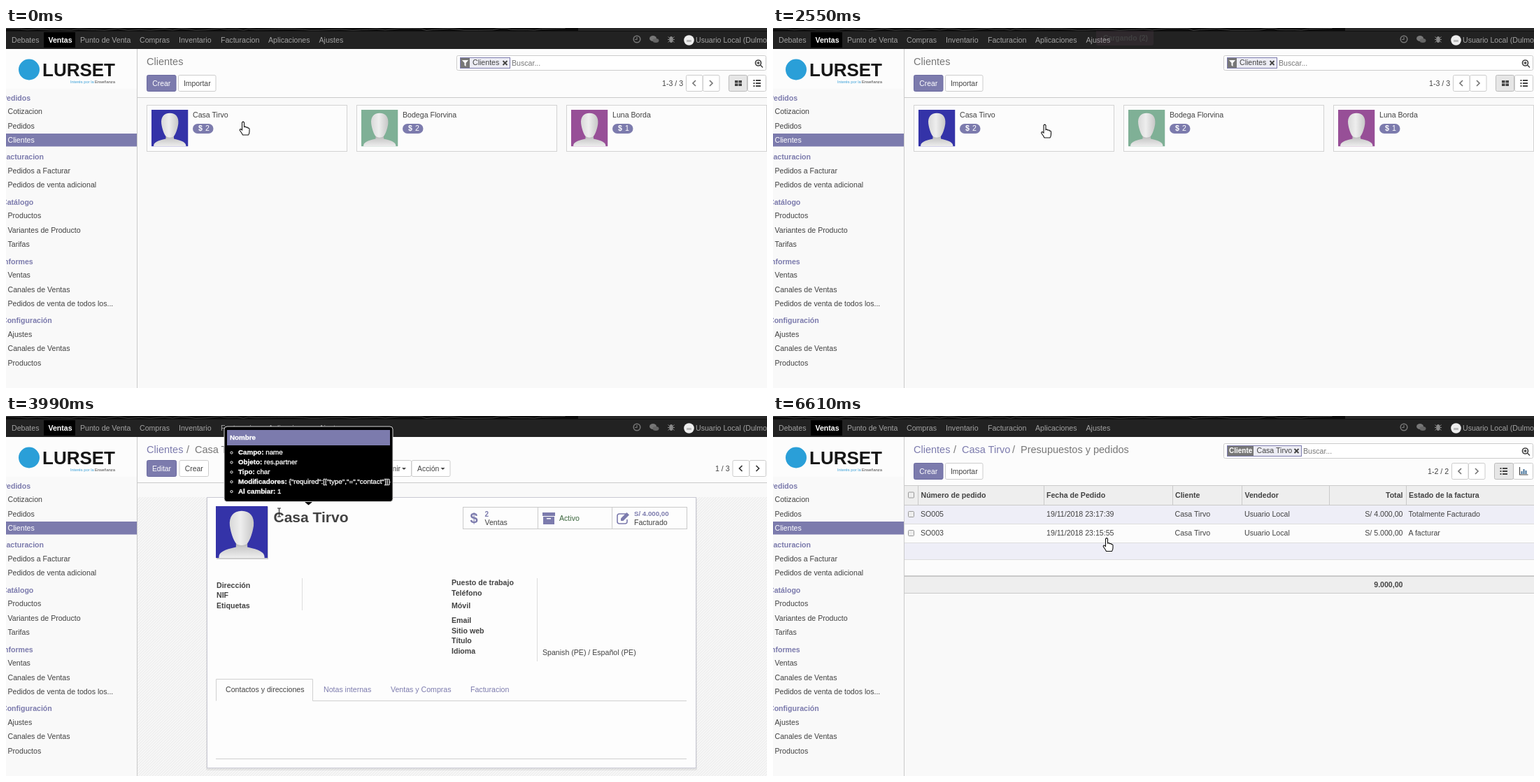
These frames come from a looping animation (1088x515 px, 8 s). An HTML page:

```html
<!DOCTYPE html>
<html lang="es">
<head>
<meta charset="utf-8">
<title>Clientes</title>
<style>
html, body { margin: 0; width: 100%; height: 100%; overflow: hidden; background: #f9f9f9 }
svg { display: block; font-family: "Liberation Sans", Arial, sans-serif }
#tip text { stroke: #fff; stroke-width: .3px }
</style>
</head>
<body>
<script>
const INK = '#424242', LILAC = '#7c7bad', GREY = '#777', LINE = '#cacaca';
const BUYER = 'Casa Tirvo', SELLER = 'Usuario Local';

// y is the middle of the capitals
const text = (x, y, s, fill = INK, bold = 0, size = 10.6, anchor = 'start') =>
  `<text x="${x}" y="${y + size * .36}" fill="${fill}" font-size="${size}" text-anchor="${anchor}"${bold ? ' font-weight="700"' : ''}>${s}</text>`;
const rect = (x, y, w, h, fill, stroke = 'none', r = 0) =>
  `<rect x="${x}" y="${y}" width="${w}" height="${h}" rx="${r}" fill="${fill}" stroke="${stroke}"/>`;
const path = (d, stroke = LINE, width = 1, fill = 'none') =>
  `<path d="${d}" stroke="${stroke}" stroke-width="${width}" fill="${fill}"/>`;
const group = (id, ...parts) => `<g id="${id}">${parts.join('')}</g>`;

const button = (x, y, w, label, main) =>
  rect(x + .5, y + .5, w - 1, 23, main ? LILAC : '#fff', main ? '#6b6aa0' : '#ccc', 2) +
  text(x + w / 2, y + 12, label, main ? '#fff' : INK, 0, 10.4, 'middle');
const menuButton = (x, y, w, label) =>
  button(x, y, w, '') + text(x + 8.5, y + 12, label, INK, 0, 10.4) +
  path(`M${x + w - 14} ${y + 11}h6l-3 3z`, 'none', 0, INK);
const pager = (x, y, label, labelX, color) =>
  text(labelX, y + 12, label) + button(x, y, 24.5, '') + button(x + 24, y, 24.5, '') +
  path(`M${x + 14} ${y + 8}l-4 4 4 4M${x + 34} ${y + 8}l4 4-4 4`, color, 1.7);
const avatar = (x, y, size, color) =>
  `<svg x="${x}" y="${y}" width="${size}" height="${size}" viewBox="0 0 100 100">` +
  rect(0, 0, 100, 100, color) +
  '<path d="M6 98C6 89 16 84 39 79V66H61V79C84 84 94 89 94 98V100H6Z" fill="url(#body)"/>' +
  '<path d="M50 9C66 9 75 20 73 38C71 52 66 66 61 72C57 77 43 77 39 72C34 66 29 52 27 38C25 20 34 9 50 9Z" fill="url(#head)"/></svg>';
const title = (x, y, s, color = LILAC) => text(x, y, s, color, 0, 14.5);
const listIcon = x => [75, 79, 83].map(y => rect(x, y - 1, 2, 2, INK) + rect(x + 3.5, y - 1, 7, 2, INK)).join('');

function search(facetEnd, hintX) {
  return rect(644.5, 39.5, 442, 21, '#fff', '#ccc', 2) +
    rect(649.5, 42.5, facetEnd - 650, 15, '#ececf4', LILAC) +
    path(`M${facetEnd - 10.5} 47l6 6m0-6l-6 6`, INK, 1.8) +
    text(hintX, 50, 'Buscar...', GREY) +
    '<circle cx="1075.500" cy="50" r="4" fill="none" stroke="#444" stroke-width="1.700"/>' +
    path('M1078.500 53l3.500 3.500M1073.500 50h4m-2-2v4', '#444', 1.5);
}

function panel(bottom) {
  return rect(188, 30, 900, bottom - 30, '#fcfcfc') + path(`M188 ${bottom - .5}H1088`);
}

function card(x, name, count, color) {
  return rect(x + .5, 110.5, 286, 66, '#fcfcfc', '#d3d3d3') + avatar(x + 7, 117, 52.5, color) +
    text(x + 66, 124, name) + rect(x + 66, 137, 29.5, 14, LILAC, 'none', 7) +
    text(x + 74, 143.5, '$', '#fff', 1) + text(x + 84, 143.5, count, '#fff');
}

const kanban = group('kanban', panel(100),
  title(201, 48, 'Clientes', GREY), button(201, 67, 42.5, 'Crear', 1), button(246, 67, 54.5, 'Importar'),
  search(721, 723), rect(650, 43, 13, 14, GREY), path('M652 46h9l-3.500 4v5l-2-1.500V50z', 'none', 0, '#fff'),
  text(667, 49.5, 'Clientes'), pager(972, 67, '1-3 / 3', 938, GREY),
  button(1060, 67, 27, ''), rect(1033.5, 67.5, 26, 23, '#e6e6e6', '#bbb', 2),
  [1042, 1047.5].map(x => rect(x, 75, 4.5, 3.5, INK) + rect(x, 79.5, 4.5, 3.5, INK)).join(''), listIcon(1068.5),
  card(201, BUYER, 2, '#3433a8'), card(501, 'Bodega Florvina', 2, '#7fb096'), card(801, 'Luna Borda', 1, '#974f97'));

const labels = (x, rows) => rows.map(([y, s]) => text(x, y, s, INK, 1)).join('');
const form = group('form', panel(96), rect(188, 116, 900, 399, 'url(#weave)'),
  title(201, 48, 'Clientes'), title(258, 48, '/', GREY), title(270, 48, BUYER, GREY),
  button(201, 63, 43, 'Editar', 1), button(247.5, 63, 42.5, 'Crear'),
  menuButton(518, 63, 62, 'Imprimir'), menuButton(579.5, 63, 56, 'Acción'),
  pager(1038.5, 63, '1 / 3', 1014, '#333'),
  rect(286, 117, 702, 390, '#0001', 'none', 2), rect(287.5, 116.5, 699, 387, '#fdfdfd', '#c8c8d3'),
  rect(301, 130, 74, 75, '#ccc'), avatar(300, 129, 74, '#3433a8'),
  text(382.5, 144.5, BUYER, INK, 1, 21),
  rect(653.5, 130.5, 320, 31, '#fdfdfd', LINE), group('hover', rect(654, 131, 106, 30, '#e4e4e4')),
  path('M760.500 131v30M866.500 131v30'),
  text(663.5, 146, '$', LILAC, 1, 20), text(684.5, 140, '2', LILAC, 1, 10), text(684.5, 152, 'Ventas'),
  rect(767, 138, 18, 5, LILAC), rect(768, 144, 16, 11, LILAC), rect(773, 146, 6, 1.5, '#fff'),
  text(791, 146, 'Activo', '#3c663d'),
  path('M886 140H877Q874 140 874 143V151Q874 154 877 154H885Q888 154 888 151V148', LILAC, 1.6),
  path('M879 150v-3.500l8.500-8.500 3.500 3.500-8.500 8.500z', 'none', 0, LILAC),
  text(898, 140, 'S/ 4.000,00', LILAC, 1, 9.7), text(898, 152, 'Facturado'),
  labels(301, [[242, 'Dirección'], [256.5, 'NIF'], [271, 'Etiquetas']]),
  labels(637, [[238.5, 'Puesto de trabajo'], [253, 'Teléfono'], [271, 'Móvil'], [292, 'Email'],
    [307, 'Sitio web'], [321.5, 'Título'], [336.5, 'Idioma']]),
  path('M423.500 232V278M759.500 232V351', '#ddd'), text(767, 338, 'Spanish (PE) / Español (PE)'),
  path('M300.500 407.500V376.500H438.500V407.500H973M300 490.500H973', '#d0d0d0'),
  text(314, 391.5, 'Contactos y direcciones'), text(454, 391.5, 'Notas internas', LILAC),
  text(550, 391.5, 'Ventas y Compras', LILAC), text(664, 391.5, 'Facturacion', LILAC));

const box = y => rect(193.5, y - 4, 8, 8, '#eee', '#999', 1);
const order = (y, id, time, total, state) => box(y) + text(211, y, id) + text(391, y, '19/11/2018 ' + time) +
  text(574.5, y, BUYER) + text(674, y, SELLER) + text(900.5, y, total, INK, 0, 10.6, 'end') + text(908.5, y, state);
const list = group('list', panel(100),
  title(201, 48, 'Clientes'), title(258, 48, '/', GREY), title(270, 48, BUYER), title(342, 48, '/', GREY),
  title(354, 48, 'Presupuestos y pedidos', GREY),
  button(201, 67, 42.5, 'Crear', 1), button(246, 67, 54.5, 'Importar'),
  search(756, 758), rect(650, 43, 37, 14, GREY), text(652, 49.5, 'Cliente', '#fff', 1, 10), text(691.5, 49.5, BUYER),
  pager(970, 67, '1-2 / 2', 936, GREY), button(1058, 67, 29, ''),
  rect(1031.5, 67.5, 27, 23, '#e6e6e6', '#bbb', 2), listIcon(1039.5),
  path('M1067.500 73v11h12', INK, 1.2), path('M1070.500 83v-4M1073.500 83v-7M1076.500 83v-5', '#47749c', 2),
  rect(188, 100, 900, 27, '#eee'), rect(188, 127, 900, 27, '#eeeef7'), rect(188, 154, 900, 27, '#fcfcfc'),
  rect(188, 181, 900, 24, '#eeeef7'), rect(188, 205, 900, 24, '#fcfcfc'), rect(188, 229, 900, 24, '#eee'),
  path('M188 154.500H1088M188 181.500H1088M188 205.500H1088', '#ddd'),
  path('M188 127.500H1088M188 253.500H1088M387.500 100v27M571.500 100v27M670.500 100v27M795.500 100v27M905.500 100v27M207.500 100v27'),
  path('M188 229H1088', '#bbb', 1.6),
  box(113),
  [[211.5, 'Número de pedido'], [391, 'Fecha de Pedido'], [575, 'Cliente'], [674.5, 'Vendedor'], [909, 'Estado de la factura']]
    .map(([x, s]) => text(x, 113, s, INK, 1)).join(''),
  text(900.5, 113, 'Total', INK, 1, 10.6, 'end'),
  order(140.5, 'SO005', '23:17:39', 'S/ 4.000,00', 'Totalmente Facturado'),
  order(167.5, 'SO003', '23:15:55', 'S/ 5.000,00', 'A facturar'),
  text(900.5, 241, '9.000,00', INK, 1, 10.6, 'end'));

const sections = [
  [100, 'Pedidos', 'Cotizacion', 'Pedidos', 'Clientes'],
  [184.5, 'Facturacion', 'Pedidos a Facturar', 'Pedidos de venta adicional'],
  [249, 'Catálogo', 'Productos', 'Variantes de Producto', 'Tarifas'],
  [334, 'Informes', 'Ventas', 'Canales de Ventas', 'Pedidos de venta de todos los...'],
  [418.5, 'Configuración', 'Ajustes', 'Canales de Ventas', 'Productos']];
const sidebar = rect(0, 30, 187, 485, '#f9f9f9') + rect(0, 30, 187, 57, '#fcfcfc') + path('M187.500 30V515') +
  '<circle cx="33" cy="59.500" r="15" fill="#2a9fd8"/>' + text(52, 60, 'LURSET', '#161616', 1, 26) +
  text(92, 77, 'Interés por la', '#3aa0d8', 0, 5.8) + text(156, 77, 'Enseñanza', '#444', 0, 5.8, 'end') +
  rect(0, 151, 187, 18.5, LILAC) +
  sections.map(([y, head, ...items]) => text(-6, y, head, LILAC, 1) +
    items.map((s, i) => text(2.5, y + 19.6 + i * 20.3, s, s == 'Clientes' ? '#fff' : INK)).join('')).join('');

let seed = 7;
const rand = () => (seed = seed * 16807 % 2147483647) / 2147483647;
let edge = 'M0 2';
for (let x = 0; x < 818; x += 6 + rand() * 16) edge += `L${x} ${(.5 + rand() * 3).toFixed(1)}`;
const navbar = rect(0, 0, 1088, 30, '#222') + rect(0, 0, 818, 4, '#0c0c0c') + rect(818, 0, 270, 4, '#282828') +
  path(edge, '#505050', .8) + path('M0 4.500H1088', '#111') + rect(54, 6, 45, 22, '#000') + text(60.5, 17, 'Ventas', '#fff', 1) +
  [[8, 'Debates'], [106, 'Punto de Venta'], [191, 'Compras'], [247, 'Inventario'], [307, 'Facturacion'],
    [375, 'Aplicaciones'], [447.5, 'Ajustes'], [986, SELLER + ' (Dulmor']]
    .map(([x, s]) => text(x, 17, s, '#a2a2a2')).join('') +
  '<circle cx="902" cy="16" r="4.800" fill="none" stroke="#777" stroke-width="1.500"/>' + path('M902 13v3.500h-3', GREY, 1.2) +
  '<ellipse cx="925" cy="15" rx="5" ry="4" fill="#777"/><ellipse cx="929" cy="18" rx="4.500" ry="3" fill="#666"/>' +
  path('M946.500 12.500l9 8m0-8l-9 8M946 16.500h10', '#888', 1) + '<ellipse cx="951" cy="16.500" rx="2.600" ry="4.500" fill="#888"/>' +
  '<circle cx="976.500" cy="17.500" r="7.300" fill="#eee"/>' + rect(973, 17, 7, 3, '#bbb', 'none', 1);

const facts = [['Campo:', 'name'], ['Objeto:', 'res.partner'], ['Tipo:', 'char'],
  ['Modificadores:', '{"required":[["type","=","contact"]]}'], ['Al cambiar:', '1']];
const tip = group('tip', rect(312, 15, 241, 107.5, '#000', '#d8d8d8', 4), path('M427 123h11l-5.500 4.500z', 'none', 0, '#000'),
  rect(316, 20, 233, 22, LILAC), text(320, 30, 'Nombre', '#fff', 1, 9.8),
  facts.map(([k, v], i) => `<circle cx="322.500" cy="${52.5 + i * 13.9}" r="1.600" fill="none" stroke="#fff"/>` +
    text(332, 51.8 + i * 13.9, `<tspan font-weight="700">${k}</tspan> ${v}`, '#fff', 0, 9.8)).join(''));

const badge = group('badge', path('M462 4H544V22Q544 25 541 25H465Q462 25 462 22Z', 'none', 0, '#875a7b'),
  group('count', text(472, 14, '', '#fff', 1, 10.4)));

const cursor = group('cursor',
  group('hand', path('M-1.500 1.200Q0-1 1.500 1.200V7.500Q3.500 6.500 4.500 8.300Q6.500 7.500 7 9.200Q9 8.800 9 10.800V14Q9 17 7.500 19H-.5Q-2 16-4.700 12.500Q-5 10.500-3.500 10.500L-1.500 12Z', '#111', 1.1, '#fff')),
  group('arrow', path('M0 0V13.500L3.200 10.500 5.400 15.500 7.400 14.600 5.200 9.800H9.500Z', '#111', 1, '#fff')),
  group('beam', path('M-2.500-6H2.500M0-6V6M-2.500 6H2.500', '#222', 1.1)));

document.body.innerHTML = `<svg width="1088" height="515" viewBox="0 0 1088 515"><defs>
  <linearGradient id="head"><stop stop-color="#d8d8d8"/><stop offset=".45" stop-color="#eee"/><stop offset="1" stop-color="#c6c6c6"/></linearGradient>
  <linearGradient id="body" x2="0" y2="1"><stop stop-color="#999"/><stop offset=".4" stop-color="#ccc"/><stop offset="1" stop-color="#eee"/></linearGradient>
  <pattern id="weave" width="4" height="4" patternUnits="userSpaceOnUse">${rect(0, 0, 4, 4, '#f6f6f6')}<path d="M-1 1l2-2M0 4L4 0M3 5l2-2" stroke="#ebebeb"/></pattern>
  </defs>${rect(0, 0, 1088, 515, '#f9f9f9')}${kanban}${form}${list}${sidebar}${navbar}${badge}${tip}${cursor}</svg>`;

const $ = id => document.getElementById(id);
const show = (id, on) => $(id).setAttribute('opacity', +on);
const part = (t, a, b) => Math.min(1, Math.max(0, (t - a) / (b - a)));
const ease = p => p * p * (3 - 2 * p);

// cursor stops: time, x, y
const stops = [[250, 339, 134], [420, 425, 130.5], [580, 496, 142], [910, 388.5, 138], [3009, 388.5, 138],
  [3010, 390.5, 138], [4050, 390.5, 138], [4460, 613, 150], [4700, 613, 150], [4860, 661, 148], [5000, 670, 148],
  [6440, 670, 148], [6610, 477, 174.5]];

function place(t) {
  const i = stops.findIndex(s => s[0] > t);
  if (i < 0) return stops.at(-1).slice(1);
  if (!i) return stops[0].slice(1);
  const [a, b] = [stops[i - 1], stops[i]], p = ease(part(t, a[0], b[0]));
  return [1, 2].map(k => a[k] + (b[k] - a[k]) * p);
}

function badgeOpacity(t) {
  if (t < 1340 || t >= 5900) return 0;
  if (t < 3010) return 1 - .87 * part(t, 2310, 2550);
  if (t < 5530) return 1 - ease(part(t, 3190, 3480));
  return 1;
}

function draw(now) {
  const t = now % 8000, [x, y] = place(t);
  const onForm = t >= 3010 && t < 5800;
  show('kanban', t < 3010);
  show('form', onForm);
  show('list', t >= 5800);
  show('hover', onForm && x > 652);
  show('badge', badgeOpacity(t));
  $('count').firstChild.textContent = `Cargando (${t >= 2310 && t < 3010 ? 2 : 1})`;
  show('tip', t < 3990 ? 0 : 1 - part(t, 4050, 4200));
  $('cursor').setAttribute('transform', `translate(${x} ${y})`);
  const beam = onForm && x < 484, arrow = onForm && !beam && x <= 652;
  show('beam', beam);
  show('arrow', arrow);
  show('hand', !beam && !arrow);
  requestAnimationFrame(draw);
}
requestAnimationFrame(draw);
</script>
</body>
</html>
```
